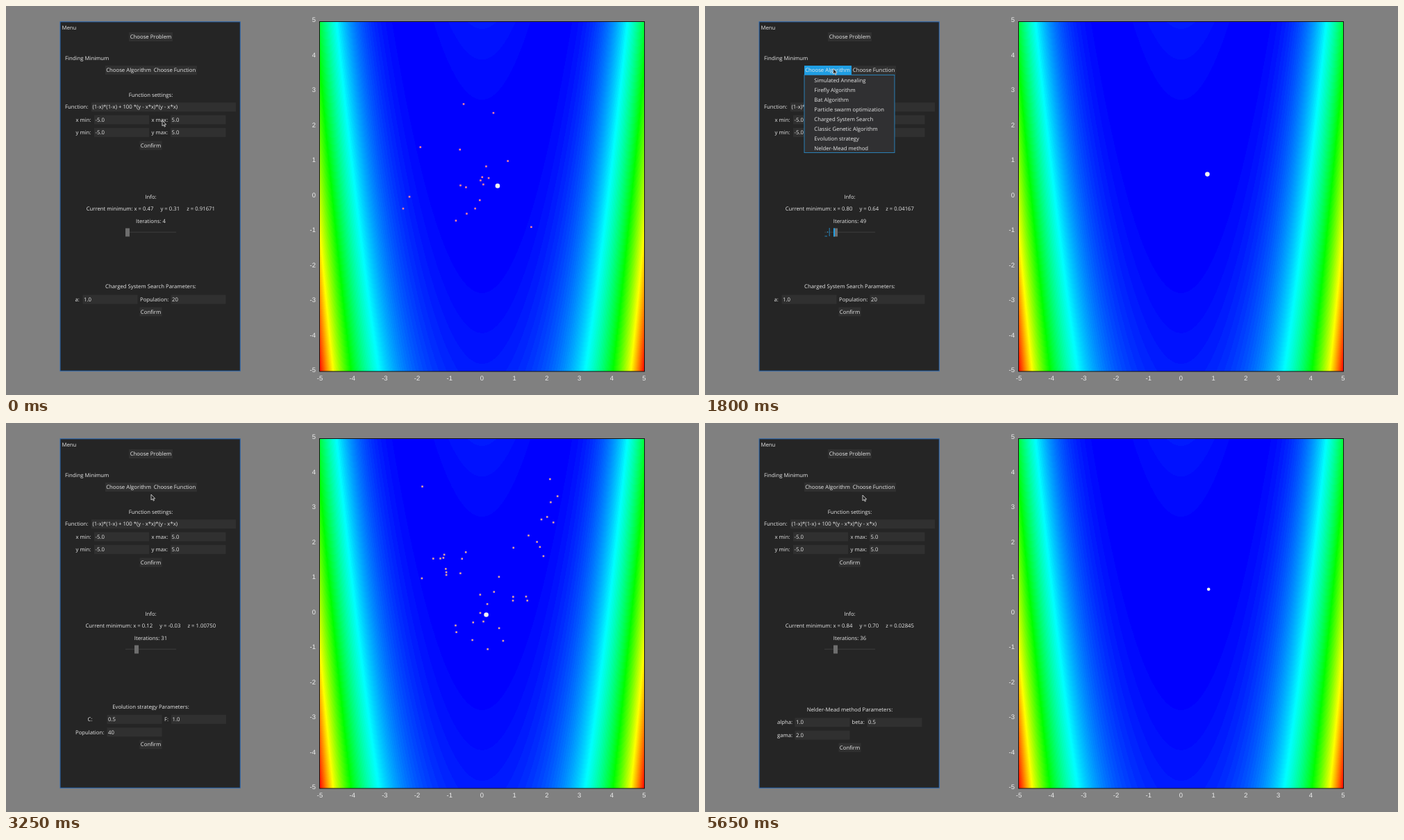
An HTML page with a canvas for the animation above (5700 ms loop, 998 px wide and 561 px high).

```html
<!DOCTYPE html>
<html lang="en">
<head>
<meta charset="utf-8">
<title>Finding Minimum</title>
<style>
  html, body { margin: 0; width: 100%; height: 100%; overflow: hidden; background: #808080; }
  canvas { position: absolute; left: 452px; top: 22px; }
  svg { position: absolute; left: 0; top: 0; }
  text { font: 7.75px "Open Sans", "Noto Sans", sans-serif; fill: #e8e8e8; white-space: pre; text-rendering: geometricPrecision; }
  .axis text { font: 9.5px "Liberation Sans", Arial, sans-serif; fill: #ececec; }
</style>
</head>
<body>
<canvas id="map" width="467" height="505"></canvas>
<svg id="stage" width="998" height="561" viewBox="0 0 998 561"></svg>
<script>
const LOOP = 5700, STEP = 50;
const EVOLUTION = 2500, SIMPLEX = 4800;
const BLUE = '#1f9ee3', FIELD = '#303030', PANEL = '#252525', LIST = '#303032';
const ROW = 18.4;
const stage = document.getElementById('stage');

const cost = (x, y) => (1 - x) ** 2 + 100 * (y - x * x) ** 2;
const rand = n => { const v = Math.sin(n * 127.1 + 3.7) * 43758.5453; return v - Math.floor(v); };
const lerp = (a, b, u) => a + (b - a) * u;
const clamp = (v, lo, hi) => Math.min(hi, Math.max(lo, v));
const px = x => 685.5 + 46.7 * x;
const py = y => 275 - 50.4 * y;

function node(tag, attrs, parent = stage) {
  const el = document.createElementNS('http://www.w3.org/2000/svg', tag);
  for (const k in attrs) el.setAttribute(k, attrs[k]);
  parent.appendChild(el);
  return el;
}
const box = (x, y, width, height, fill, parent) => node('rect', { x, y, width, height, fill }, parent);
function label(x, mid, str, anchor = 'start', parent = stage) {
  const el = node('text', { x, y: mid + 2.7, 'text-anchor': anchor }, parent);
  el.textContent = str;
  return el;
}
function button(x, mid, w, str, parent) {
  box(x - w / 2, mid - 6.5, w, 13, FIELD, parent);
  label(x, mid, str, 'middle', parent);
}
function field(nameX, x, w, mid, name, value, parent) {
  label(nameX, mid, name, 'start', parent);
  box(x, mid - 6.5, w, 13, FIELD, parent);
  label(x + 1.5, mid, value, 'start', parent);
}
const show = (el, on) => el.setAttribute('display', on ? 'inline' : 'none');

// Cost in banded rainbow colours, blue (low) to red (high)
function drawMap() {
  const { width, height } = document.getElementById('map');
  const ctx = document.getElementById('map').getContext('2d');
  const image = ctx.createImageData(width, height);
  const levels = 118, max = cost(-5, -5);
  const shade = v => 255 * clamp(v, 0, 1);
  for (let row = 0, at = 0; row < height; row++) {
    for (let col = 0; col < width; col++, at += 4) {
      const x = 10 * (col + 0.5) / width - 5, y = 5 - 10 * (row + 0.5) / height;
      const v = 4 * Math.floor(cost(x, y) / max * levels) / levels;
      image.data.set([shade(v - 2), shade(Math.min(v, 4 - v)), shade(2 - v), 255], at);
    }
  }
  ctx.putImageData(image, 0, 0);
}

function drawAxes() {
  node('rect', { x: 451.5, y: 22.5, width: 468, height: 504.5, fill: 'none', stroke: '#111' });
  const axis = node('g', { class: 'axis' });
  for (let v = -5; v <= 5; v++) {
    label(px(v), 537, v, 'middle', axis);
    label(446, 273 - 50.5 * v, v, 'end', axis);
  }
}

// Menu panel
drawMap();
drawAxes();
node('rect', { x: 78, y: 22.8, width: 259.3, height: 503.5, fill: PANEL, stroke: '#2a69b4' });
label(80.5, 31, 'Menu');
button(208.5, 44.5, 63, 'Choose Problem');
label(85, 75, 'Finding Minimum');
const algorithmBox = box(143, 86, 68, 13, FIELD);
label(176.5, 92.7, 'Choose Algorithm', 'middle');
button(243, 92.7, 64, 'Choose Function');
label(208.5, 128, 'Function settings:', 'middle');
field(85, 123, 208, 145.7, 'Function:', '(1-x)*(1-x) + 100 *(y - x*x)*(y - x*x)');
['x', 'y'].forEach((name, i) => {
  const mid = 164 + i * ROW;
  field(100.5, 127, 79, mid, name + ' min:', '-5.0');
  field(209.5, 237, 79.5, mid, name + ' max:', '5.0');
});
button(208.5, 201, 32, 'Confirm');
label(208.5, 275, 'Info:', 'middle');
const minimumText = label(208.3, 292.7, '', 'middle');
const iterationText = label(208.5, 310, '', 'middle');

// Speed slider
box(172, 325.7, 73, 1, '#3c3c3c');
const trail = node('path', { d: 'M179.2 320V332M172.5 332H176M176.5 325V327', stroke: '#2384bd', fill: 'none' });
const handle = box(172, 320.5, 6, 12, '#6e6e6e');
const handleEdge = box(185, 320.5, 2, 12, BLUE);

// Parameter blocks; each field is [row, name x, field x, name, value]
const blocks = [
  { title: 'Charged System Search', top: 404.7, rows: 1, fields: [
    [1, 99.5, 110.5, 'a:', '1.0'], [1, 193, 237.5, 'Population:', '20']] },
  { title: 'Evolution strategy', top: 409, rows: 2, fields: [
    [1, 117.5, 145.5, 'C:', '0.5'], [1, 228, 238, 'F:', '1.0'], [2, 100, 145.5, 'Population:', '40']] },
  { title: 'Nelder-Mead method', top: 413.3, rows: 2, fields: [
    [1, 104, 129.5, 'alpha:', '1.0'], [1, 211.5, 233.5, 'beta:', '0.5'], [2, 104, 129.5, 'gama:', '2.0']] }
].map(({ title, top, rows, fields }) => {
  const g = node('g', {});
  label(208.5, top, title + ' Parameters:', 'middle', g);
  fields.forEach(([row, nameX, x, name, value]) => field(nameX, x, 79, top + row * ROW, name, value, g));
  button(208.5, top + (rows + 1) * ROW - 0.5, 32, 'Confirm', g);
  return g;
});

// Drop-down list
const list = node('g', {});
node('rect', { x: 143, y: 99.5, width: 130, height: 112, fill: LIST, stroke: '#2a7fb4' }, list);
const items = ['Simulated Annealing', 'Firefly Algorithm', 'Bat Algorithm', 'Particle swarm optimization',
  'Charged System Search', 'Classic Genetic Algorithm', 'Evolution strategy', 'Nelder-Mead method'
].map((name, i) => {
  const back = box(143, 98 + i * 14, 130.3, 14, 'none', list);
  back.setAttribute('y', 99.8 + i * 14 - (i ? 1.8 : 0));
  label(157.3, 107 + i * 14, name, 'start', list);
  return back;
});
const openings = [
  { from: 1750, to: EVOLUTION, hover: 2400, item: 6 },
  { from: 3700, to: SIMPLEX, hover: 4650, item: 7 }
];

const dots = Array.from({ length: 40 }, () => box(0, 0, 2.6, 2.6, '#fff'));
const best = node('circle', { fill: '#f4f4f4' });
const cursor = node('path', { d: 'M0 0V8L2 6.4L3.3 9.2L4.5 8.6L3.2 6H5.7Z', fill: '#222', stroke: '#e4e4e4', 'stroke-width': 0.8 });

// Best solution so far: time, x, y, z
const minima = [
  [[0, 0.47, 0.31, 0.91671], [1200, 0.72, 0.53, 0.07646], [1850, 0.83, 0.68, 0.03008]],
  [[2500, -0.61, 0.52, 4.77953], [3250, 0.12, -0.03, 1.0075], [4100, 0.88, 0.76, 0.02978], [4600, 0.98, 0.96, 0.0143]],
  [[4800, 0.12, 0.05, 0.90113], [5600, 0.84, 0.7, 0.02845]]
];
const pointer = [
  [0, 225, 165], [200, 225, 165], [950, 175, 329], [1150, 188, 329], [1400, 188, 329], [1750, 184, 90],
  [2000, 190, 92], [2300, 200, 191], [2500, 200, 191], [3100, 209, 103], [3350, 209, 103],
  [3700, 194, 92], [4350, 194, 94], [4650, 220, 207], [4800, 220, 207], [5650, 227, 104]
];

// Interpolates key points of the form [time, ...values]
function along(keys, t, ease) {
  const next = keys.findIndex(k => k[0] > t);
  if (next < 0) return keys[keys.length - 1].slice(1);
  const a = keys[next - 1], b = keys[next];
  const u = ease((t - a[0]) / (b[0] - a[0]));
  return a.slice(1).map((v, i) => lerp(v, b[i + 1], u));
}
const smooth = u => u * u * (3 - 2 * u);
const jumps = u => Math.floor(u * 4) / 4;

// Charged particles scatter, then collapse onto the best point
function chargedAt(i, t, [bx, by]) {
  const u = clamp((t - 150) / 650, 0, 1);
  if (i >= 19 || u === 1) return null;
  const angle = rand(i + 200) * 2 * Math.PI;
  const radius = 0.25 + 2.3 * rand(i + 230) ** 2;
  const kick = Math.sin(Math.PI * u) * (i % 5 ? 0.7 : 2.6);
  return [
    lerp(-0.25 + radius * Math.cos(angle), bx, u) + kick * Math.cos(angle + 5 * u),
    lerp(0.2 + radius * Math.sin(angle), by, u) + kick * Math.sin(angle + 5 * u)
  ];
}

// Each individual is redrawn now and then, ever closer to the valley y = x * x
function evolvedAt(i, t) {
  const life = 300, offset = rand(i + 300);
  const generation = Math.floor((t - EVOLUTION) / life + offset);
  const p = clamp((generation - offset) * life / (SIMPLEX - EVOLUTION), 0, 1), q = 1 - p;
  const seed = i * 31 + generation * 7.3;
  const pick = lerp(rand(seed), Math.sqrt(rand(seed)), p);
  const x = lerp(-0.05 - 2.2 * q - 3 * q ** 8, 1.15 + 1.5 * q + 2 * q ** 8, pick);
  const y = x * x * p ** 0.3 + (rand(seed + 500) - 0.5) * (0.12 + 9 * q ** 4);
  return [x, clamp(y, -4.9, 4.9)];
}

function iterations(t) {
  if (t >= SIMPLEX) return (t - 4750) / 25;
  if (t >= EVOLUTION) return 31 + (t - 3250) / 25;
  return t < 900 ? 4 + Math.max(0, t - 150) / 83 : 13 + (t - 900) / 25;
}

function render(t) {
  const phase = t < EVOLUTION ? 0 : t < SIMPLEX ? 1 : 2;
  cursor.setAttribute('transform', `translate(${along(pointer, t, smooth)})`);
  blocks.forEach((g, i) => show(g, i === phase));

  const [x, y, z] = along(minima[phase], t, jumps);
  minimumText.textContent = `Current minimum: x = ${x.toFixed(2)}     y = ${y.toFixed(2)}     z = ${z.toFixed(5)}`;
  iterationText.textContent = 'Iterations: ' + Math.floor(iterations(t));
  best.setAttribute('cx', px(x) + 0.5);
  best.setAttribute('cy', py(y));
  best.setAttribute('r', phase === 2 ? 2.3 : 3.3);

  const dragging = t >= 900 && t < 1450;
  handle.setAttribute('x', lerp(172, 185, clamp((t - 950) / 200, 0, 1)));
  handle.setAttribute('fill', dragging ? BLUE : '#6e6e6e');
  show(handleEdge, t >= 1450 && t < EVOLUTION);
  show(trail, t >= 1050 && t < EVOLUTION);

  const open = openings.find(o => t >= o.from && t < o.to);
  show(list, open);
  algorithmBox.setAttribute('fill', open ? BLUE : FIELD);
  items.forEach((back, i) => back.setAttribute('fill', open && t >= open.hover && i === open.item ? BLUE : 'none'));

  dots.forEach((dot, i) => {
    const p = phase === 0 ? chargedAt(i, t, [x, y]) : phase === 1 ? evolvedAt(i, t) : null;
    show(dot, p);
    if (!p) return;
    dot.setAttribute('x', px(p[0]) - 1.3);
    dot.setAttribute('y', py(p[1]) - 1.3);
    dot.setAttribute('fill', phase ? '#dca0a0' : '#f0809c');
  });
}

const start = performance.now();
function tick() {
  const t = (performance.now() - start) % LOOP;
  render(Math.floor(t / STEP) * STEP);
  requestAnimationFrame(tick);
}
tick();
</script>
</body>
</html>
```
